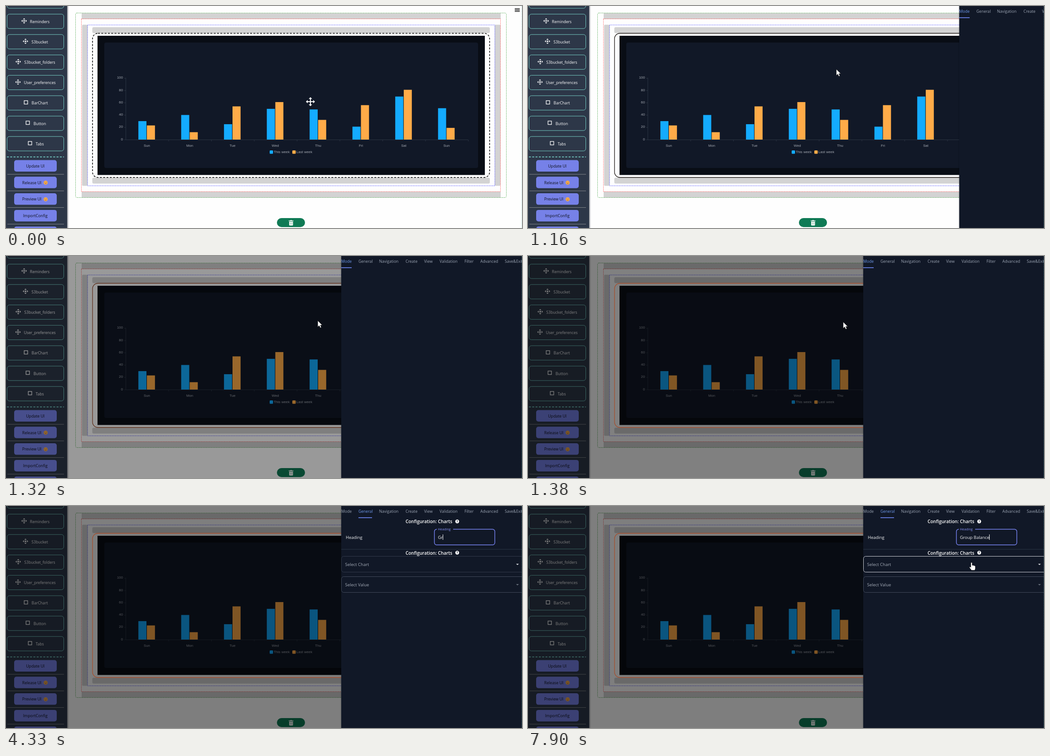
An HTML page that plays this animation: 1139 by 492 pixels, repeating every 8000 ms.

```html
<!DOCTYPE html>
<html lang="en">
<head>
<meta charset="utf-8">
<style>
  html, body { margin: 0; width: 100%; height: 100%; overflow: hidden; background: #fefefe; }
  svg { display: block; font-family: "Open Sans", "Noto Sans", sans-serif; }
  .chart { font: 7.8px "Liberation Sans", Arial, sans-serif; fill: #a3a8b1; }
  .side { font-size: 8.6px; fill: #fff; }
  .action { font-size: 8.75px; fill: #10131c; }
  .tab { font-size: 8.6px; fill: #9ca5b4; }
  .title { font-size: 10px; font-weight: 600; fill: #fff; }
  .field { font-size: 9.45px; fill: #f3f4f6; }
  .hint { font-size: 9.5px; fill: #a5acb8; }
</style>
</head>
<body>
<svg id="stage" width="1139" height="492" viewBox="0 0 1139 492"></svg>
<script>
const LOOP = 8000;
const HEADING = 'Group Balance';
const KEY_TIMES = [4060, 4260, 4530, 4730, 4870, 5050, 5400, 5660, 5860, 6030, 6460, 6850, 6990];

const rect = (x, y, w, h, fill, more = '') =>
  `<rect x="${x}" y="${y}" width="${w}" height="${h}" fill="${fill}" ${more}/>`;
const frame = (x, y, w, h, stroke, more = '') => rect(x, y, w, h, 'none', `stroke="${stroke}" ${more}`);
const path = (d, more = '') => `<path d="${d}" ${more}/>`;
const text = (x, y, cls, str, anchor = 'start', more = '') =>
  `<text x="${x}" y="${y}" class="${cls}" text-anchor="${anchor}" ${more}>${str.replace('&', '&amp;')}</text>`;
const fourWays = (d, more = '') => [0, 90, 180, 270].map(a => path(d, `transform="rotate(${a})" ${more}`)).join('');

const moveIcon = (x, y) => `<g transform="translate(${x} ${y}) scale(.6)" fill="#fff"><circle r="3"/>` +
  fourWays('M3.6-6.4 1.8-4.7 0-6.4-1.8-4.7-3.6-6.4 0-10z') + '</g>';

const smiley = (x, y) => `<circle cx="${x}" cy="${y}" r="4.5" fill="#f8ae4c"/>` +
  path(`M${x - 2.5} ${y - 1}h1.6m2 0h1.6M${x - 2} ${y + 2}h4`, 'stroke="#96603c"');

function sidebar() {
  const items = [['Reminders', 40], ['S3bucket', 43], ['S3bucket_folders', 27], ['User_preferences', 26.5],
    ['BarChart', 44], ['Button', 48], ['Tabs', 53]];
  const actions = ['Update UI', 'Release UI', 'Preview UI', 'ImportConfig', ''];
  const box = y => frame(2.5, y, 125, 32, '#81e6d9', 'rx="5" stroke-width=".85"');
  let out = rect(0, 0, 135, 492, '#2d3748') + rect(135, 0, 2, 492, '#b4b6ba') + rect(137, 0, 2, 492, '#ececee') + box(-27);
  items.forEach(([name, iconX], i) => {
    const y = 18 + 45.2 * i;
    out += box(y) + text(74.5, y + 19.6, 'side', name, 'middle') +
      (i < 4 ? moveIcon(iconX, y + 15) : frame(iconX - 3.8, y + 11, 7.6, 7.6, '#fff', 'stroke-width="1.3"'));
  });
  out += path('M2 334.5H128', 'stroke="#81e6d9" stroke-width="1.45" stroke-dasharray="4.4 2.9"');
  actions.forEach((name, i) => {
    const y = 341.5 + 36.8 * i, face = i === 1 || i === 2;
    out += rect(18, y, 94, 25.5, '#7681e8', 'rx="5"') +
      text(face ? 57 : 64.7, y + 16.2, 'action', name, 'middle') +
      (face ? smiley(87.5, y + 13.3) : '') +
      path(`M3 ${y + 31.5}H128`, 'stroke="#85888c"');
  });
  return out;
}

function barChart() {
  const days = ['Sun', 'Mon', 'Tue', 'Wed', 'Thu', 'Fri', 'Sat', 'Sun'];
  const thisWeek = [30, 40, 25, 50, 49, 21, 70, 51], lastWeek = [23, 12, 54, 61, 32, 56, 81, 19];
  const unit = 1.362, step = 94.5, blue = '#14abff', orange = '#ffab48';
  const bar = (x, v, fill) => rect(x, 296 - v * unit, 17.8, v * unit, fill);
  let out = rect(202, 66, 855, 308.5, '#090d15') + rect(217, 81, 825, 278, '#111827', 'rx="4"');
  let axes = 'M264.5 159V296.5H1020';
  for (let v = 0; v <= 100; v += 20) {
    const y = 296 - v * unit;
    axes += `M261 ${y + .3}h3.5`;
    out += text(258, y + 1.6, 'chart', String(v), 'end');
  }
  days.forEach((day, i) => {
    const x = 311 + step * i;
    axes += `M${264.5 + step * (i + 1)} 296.5v3.5`;
    out += bar(x - 18.8, thisWeek[i], blue) + bar(x, lastWeek[i], orange) + text(x, 311.8, 'chart', day, 'middle');
  });
  return out + path(axes, 'fill="none" stroke="#323b4a" stroke-width=".8"') +
    rect(582, 320, 7.5, 7.5, blue, 'rx="1.5"') + text(591, 326.2, 'chart', 'This week') +
    rect(632, 320, 7.5, 7.5, orange, 'rx="1.5"') + text(641, 326.2, 'chart', 'Last week');
}

function canvasArea() {
  const grey = '#d3d3d3', thin = 'stroke-width=".75" stroke-dasharray="2.2 1.45"';
  return rect(167, 16, 925, 13, grey) + rect(167, 411.5, 925, 13, grey) +
    rect(168, 41.5, 12, 357, grey, 'rx="2"') + rect(1079, 41.5, 12.5, 357, grey, 'rx="2"') +
    rect(190.5, 47, 877.5, 13, grey, 'rx="3"') + rect(190.5, 380.5, 877.5, 13, grey, 'rx="3"') +
    frame(153.5, 15.5, 951, 409, '#2f9a2f', thin + ' rx="3"') +
    frame(166.5, 28.5, 925, 383, '#ff3c3c', thin) +
    frame(180, 42, 899, 356.5, '#2a2aff', thin) +
    rect(191, 60.5, 876.5, 319.5, '#fefefe', 'rx="12"') +
    frame(191, 60.5, 876.5, 319.5, '#000', 'id="dashed" rx="12" stroke-width="1.45" stroke-dasharray="4.4 2.9"') +
    barChart() +
    path('M166.5 412V424', 'id="pageCaret" stroke="#222"') +
    path('M1123 6H1134M1123 9H1134M1123 12H1134', 'stroke="#111" stroke-width="1.5"') +
    rect(598, 470, 62, 20, '#0f7a55', 'rx="10"') +
    path('M624 475.5h3l1-1h2.5l1 1h3v1.4H624zM625 478h8.5v7q0 1.5-1.5 1.5h-5.5q-1.5 0-1.5-1.5z', 'fill="#fff"') +
    path('M627.6 479.5v5M630.9 479.5v5', 'stroke="#0f7a55" stroke-width=".7"');
}

function drawer() {
  const tabs = [['Mode', 740], ['General', 778], ['Navigation', 823.5], ['Create', 882], ['View', 923],
    ['Validation', 957], ['Filter', 1012], ['Advanced', 1047], ['Save&Exit', 1101]];
  const title = y => text(933.5, y, 'title', 'Configuration: Charts', 'middle') +
    `<circle cx="996" cy="${y - 4}" r="4.2" fill="#fff"/>` +
    text(996, y - 1.2, '', '?', 'middle', 'font-size="7.5" font-weight="700" fill="#111827"');
  const select = (id, y, label, stroke, arrow) =>
    frame(740.5, y, 403, 35, stroke, `id="${id}" rx="5" stroke-width=".9"`) +
    text(748.5, y + 21.5, 'hint', label) + path(`M1126 ${y + 16.5}h6l-3 3z`, `fill="${arrow}"`);
  return rect(738, 0, 2, 492, '#000', 'opacity=".1"') + rect(740, 0, 420, 492, '#111827') +
    tabs.map(([name, x], i) => text(x, 15, 'tab', name, 'start', `id="tab${i}"`)).join('') +
    rect(740, 25, 23, 1.7, '#6b84ee', 'id="indicator"') +
    '<g id="form">' + title(38.3) + title(107.5) +
    text(750, 73, 'field', 'Heading') +
    frame(945.6, 51.5, 133.4, 34.8, '#2d3646', 'id="input" rx="5"') +
    rect(951, 49, 36, 5, '#111827', 'id="notch"') +
    '<text id="label" class="hint">Heading</text>' +
    text(953.5, 73, 'field', '', 'start', 'id="typed"') +
    rect(953, 63, 1, 12, '#fff', 'id="caret"') +
    path('M740 96H1139', 'stroke="#2d3646"') +
    select('chartSelect', 111.5, 'Select Chart', '#353e4e', '#d5d8dd') +
    select('valueSelect', 156.5, 'Select Value', '#485160', '#68707d') + '</g>';
}

function cursors() {
  const edge = 'fill="#fff" stroke="#111" stroke-width=".7" stroke-linejoin="round"';
  return '<g id="pointer">' +
    '<g id="move" fill="#fff">' + fourWays('M-1 0V-6H-3.8L0-10 3.8-6H1V0z') + '</g>' +
    path('M0 0V14L3.3 11 5.5 16 8 15 5.8 10H10z', `id="arrow" ${edge}`) +
    path('M-1.5 1Q0-1 1.5 1V6.5Q3 5.5 4 7Q5.5 6 6.3 7.5Q8.5 7 8.5 9V13Q8.5 15 7 17.5H0L-4.5 11.5Q-4.5 8.5-1.5 11z',
      `id="hand" ${edge}`) +
    path('M-2.5-8.5H-.8L0-7.7.8-8.5H2.5M0-7.7V7.7M-2.5 8.5H-.8L0 7.7.8 8.5H2.5', 'id="beam" fill="none" stroke="#e8eaee"') +
    '</g>';
}

document.getElementById('stage').innerHTML = canvasArea() + sidebar() +
  rect(0, 0, 1139, 492, '#000', 'id="scrim"') +
  frame(191, 60.5, 876.5, 319.5, '#000', 'id="selected" rx="12" stroke-width="1.3"') +
  `<g id="drawer">${drawer()}</g>` +
  path('M1138.5 0V492', 'stroke="#5fb5ac" stroke-width=".75" stroke-dasharray="2.2 1.45" opacity=".6"') + cursors();

const el = {};
document.querySelectorAll('[id]').forEach(node => el[node.id] = node);
const set = (id, attrs) => { for (const k in attrs) el[id].setAttribute(k, attrs[k]); };
const show = (id, on) => { el[id].style.display = on ? '' : 'none'; };
const ramp = (t, from, to) => Math.min(1, Math.max(0, (t - from) / (to - from)));
const smooth = p => p * p * (3 - 2 * p);
const mix = (a, b, p) => a + (b - a) * p;

// time, x, y
const ROUTE = [[70, 672, 212], [850, 679, 143], [940, 680, 140], [1160, 680.5, 140], [1260, 680.5, 140], [1380, 695.5, 146.5],
  [1790, 796, 10], [2240, 796, 10], [2450, 811, 34], [2990, 974.5, 64], [7510, 974.5, 64], [7850, 979, 125]];
function pointerAt(t) {
  const i = ROUTE.findIndex(stop => stop[0] > t);
  if (i <= 0) return ROUTE[i ? ROUTE.length - 1 : 0].slice(1);
  const [a, b] = [ROUTE[i - 1], ROUTE[i]], p = ramp(t, a[0], b[0]);
  return [mix(a[1], b[1], p), mix(a[2], b[2], p)];
}

function pointerShape(t, x, y) {
  if (t < 1160) return 'move';
  if (t > 4060 && t < 7510) return '';
  if (x > 945 && y > 51 && y < 87) return 'beam';
  if (x > 770 && y < 27 || y > 112 && t > 7510) return 'hand';
  return 'arrow';
}

function draw(t) {
  const open = t >= 1160, clicked = t >= 2240, focused = t >= 3060;
  show('pageCaret', t >= 480 && !open);
  show('dashed', !open);
  show('selected', open);
  show('drawer', open);
  show('form', clicked);

  set('scrim', { opacity: smooth(ramp(t, 1160, 1385)) / 2 });
  const glow = ramp(t, 1260, 1380);
  set('selected', { stroke: `rgb(${mix(24, 166, glow)},${mix(18, 78, glow)},${mix(14, 44, glow)})` });
  set('drawer', { transform: `translate(${400 * (1 - ramp(t, 1140, 1250)) ** 3} 0)` });

  el.tab0.style.fill = clicked ? '' : '#6f9bee';
  el.tab1.style.fill = clicked ? '#6f9bee' : '';
  const slide = smooth(ramp(t, 2480, 2780));
  set('indicator', { x: mix(740, 778, slide), width: mix(23, 30, slide) });

  const shrink = 1 - (1 - ramp(t, 3060, 3260)) ** 3;
  const [x, y] = pointerAt(t), shape = pointerShape(t, x, y);
  const hover = shape === 'beam';
  set('input', { stroke: focused ? '#7783f2' : hover ? '#e5e7eb' : '#2d3646', 'stroke-width': focused ? 1.45 : .9 });
  show('notch', focused);
  set('label', { transform: `translate(953.5 ${mix(73, 54, shrink)}) scale(${mix(1, .76, shrink)})` });
  el.label.style.fill = focused ? '#8791f3' : '';

  el.typed.textContent = HEADING.slice(0, KEY_TIMES.filter(k => k <= t).length);
  set('caret', { x: 953.2 + el.typed.getComputedTextLength() });
  show('caret', focused && !(t >= 3670 && t < 4060));
  set('chartSelect', { stroke: t > 7510 && y > 112 ? '#e2e5ea' : '#353e4e' });

  set('pointer', { transform: `translate(${x} ${y})` });
  for (const s of ['move', 'arrow', 'hand', 'beam']) show(s, s === shape);
}

const start = performance.now();
function tick() {
  draw((performance.now() - start) % LOOP);
  requestAnimationFrame(tick);
}
tick();
</script>
</body>
</html>
```
